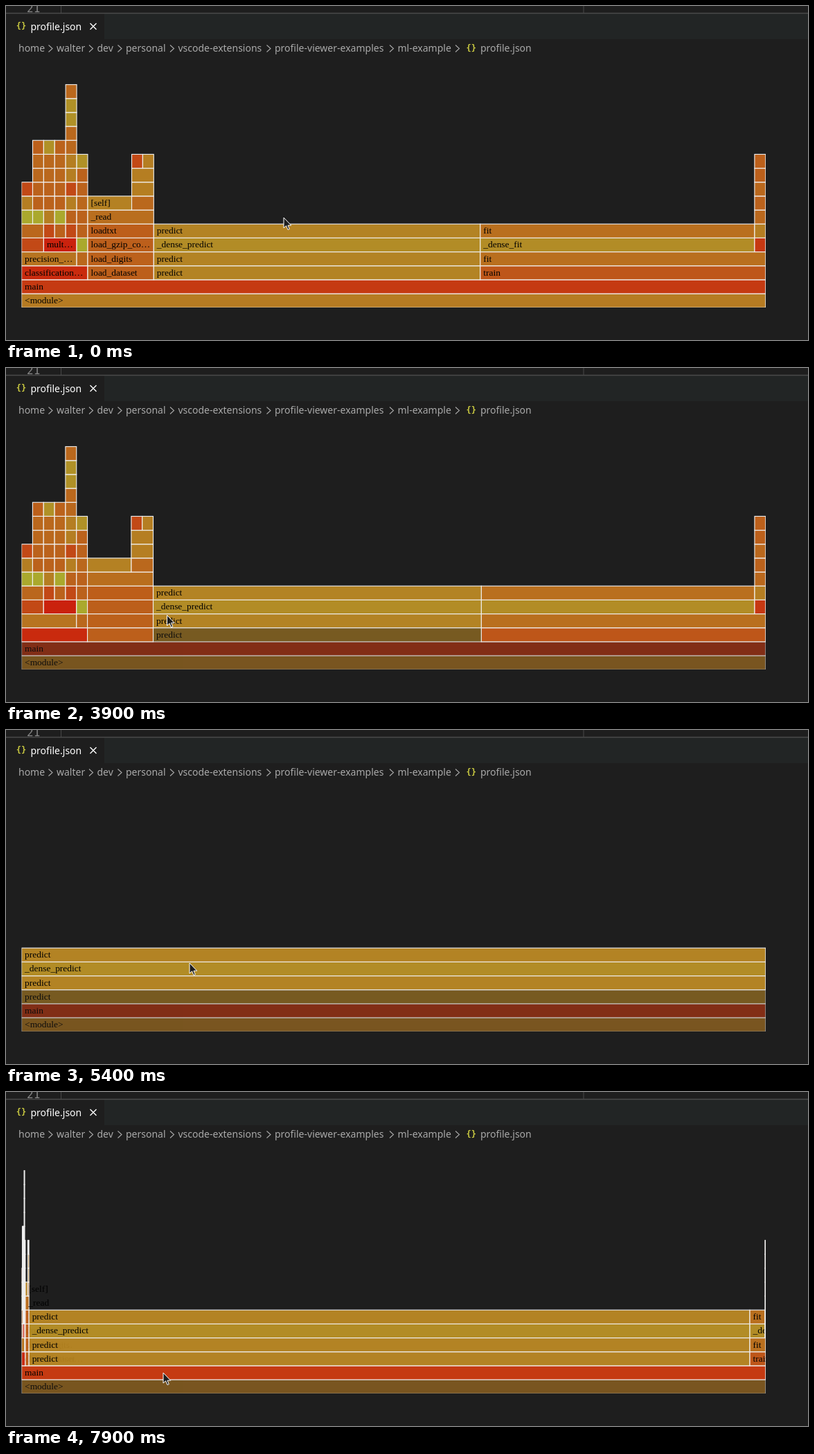
Write an HTML page that moves like this. It is 1158 px wide and 483 px high and loops after 8 s.

```html
<!DOCTYPE html>
<html lang="en">
<head>
<meta charset="utf-8">
<title>Flame graph</title>
<style>
  html, body { margin: 0; width: 100%; height: 100%; overflow: hidden; background: #1e1e1e; }
  svg { display: block; }
  #ui { font: 14px "Noto Sans", "Open Sans", sans-serif; fill: #a9a9a9; }
  .brace { font: bold 12px "DejaVu Sans Mono", monospace; fill: #cbcb41; }
  .line { font: 16px "DejaVu Sans Mono", monospace; fill: #858585; }
  #chart text { font: 13.44px "Liberation Serif", serif; fill: #000; }
  #chart rect { fill-opacity: .8; stroke: #eee; stroke-width: 1.12; }
</style>
</head>
<body>
<svg id="stage" width="1158" height="483" viewBox="0 0 1158 483">
  <g id="ui">
    <rect x="142" y="11" width="1016" height="37" fill="#222525"/>
    <text class="line" x="30" y="8.5">21</text>
    <path d="M79.5 0V10M834 0V10" stroke="#484848"/>
    <path d="M0 10.5H1158" stroke="#4a4a4a" stroke-width="1.5"/>
    <text class="brace" x="14.7" y="33">{}</text>
    <text x="35.5" y="34.5" fill="#fff">profile.json</text>
    <path d="M121.5 25l9 9m0-9l-9 9" stroke="#fff" stroke-width="1.4"/>
    <text class="brace" x="664.5" y="65">{}</text>
  </g>
  <svg id="chart" x="22.5" y="113" width="1074.5" height="323" viewBox="22.5 113 1074.5 323"></svg>
  <path id="cursor" d="M0 0V15L3.6 11.8L6 17.5L8.3 16.5L6 11.2H10.7Z" fill="#1e1e1e" stroke="#fff"/>
</svg>
<script>
const LOOP = 8000, STEP = 100;
const LEFT = 22.6, BOTTOM = 436.2, ROW = 20.16, UNIT = 15.89;
const START = 12, SPLIT = 41.67, TOTAL = 67.6, END = TOTAL - 1;
const MIN_LABEL = 39, MARGIN = 4.5;
const ZOOM_IN = 3825, ZOOMED = 4700, ZOOM_OUT = 7700, DURATION = 750;

const $ = id => document.getElementById(id);
const clamp = k => Math.max(0, Math.min(1, k));
function set(el, attrs) {
  for (const k in attrs) el.setAttribute(k, attrs[k]);
}
function add(parent, tag, attrs, text = "") {
  const el = document.createElementNS("http://www.w3.org/2000/svg", tag);
  set(el, attrs);
  el.textContent = text;
  parent.append(el);
  return el;
}

// Breadcrumbs, each followed by a chevron
const crumbs = { home: 18, walter: 73, dev: 131.5, personal: 173, "vscode-extensions": 248.5,
  "profile-viewer-examples": 388, "ml-example": 565.5, "profile.json": 685 };
for (const [name, x] of Object.entries(crumbs)) {
  add($("ui"), "text", { x, y: 66 }, name);
  if (x === crumbs.home) continue;
  const tip = x - (name === "profile.json" ? 30.5 : 6);
  add($("ui"), "path", { d: `M${tip - 5.5} 56.5l5.5 5l-5.5 5`, fill: "none", stroke: "#a9a9a9", "stroke-width": 1.1 });
}

// The heat of a frame comes from the first letters of its function name
function heat(name) {
  let sum = 0, max = 0, weight = 1;
  for (const c of name.slice(0, 7)) {
    sum += weight * (c.charCodeAt(0) % 10);
    max += weight * 9;
    weight *= .7;
  }
  return sum / max;
}
function colour(name) {
  const v = heat(name);
  return `rgb(${200 + 55 * v},${230 * (1 - v)},${55 * (1 - v)})`;
}

// Call tree: calls stacked upward from a row
const nodes = [];
function stack(from, to, row, calls) {
  calls.split(" ").forEach((name, i) => nodes.push({ from, to, row: row + i, name }));
}
stack(0, TOTAL, 0, "<module> main");
stack(0, 6, 2, "classification_report");
stack(0, 5, 3, "precision_recall_fscore_support");
stack(0, 2, 4, "_check_targets unique_labels");
stack(2, 5, 4, "multilabel_confusion_matrix");
stack(0, 1, 6, "<genexpr> type_of_target _check_targets");
stack(1, 2, 6, "<genexpr> _unique _unique unique unique isinstance");
stack(2, 3, 5, "_check_targets type_of_target _unique _unique unique unique ndim");
stack(3, 4, 5, "_unique <genexpr> _unique _unique unique unique _unique");
stack(4, 5, 5, "_check_targets _unique type_of_target _check_targets type_of_target type_of_target unique unique ndim ndim unique");
stack(5, 6, 3, "unique <genexpr> _unique _unique unique _unique _unique ndim");
stack(6, START, 2, "load_dataset load_digits load_gzip_compressed_csv_data loadtxt _read");
stack(6, 10, 7, "[self]");
stack(10, START, 7, "unique type_of_target type_of_target");
stack(10, 11, 10, "_check_targets");
stack(11, START, 10, "type_of_target");
stack(START, SPLIT, 2, "predict predict _dense_predict predict");
stack(SPLIT, TOTAL, 2, "train fit");
stack(SPLIT, END, 4, "_dense_fit fit");
stack(END, TOTAL, 4, "sum type_of_target unique _unique unique isinstance isinstance");
nodes.sort((a, b) => a.row - b.row || a.from - b.from);

function shorten(text, room) {
  const name = text.textContent;
  for (let n = name.length - 1; n > 0 && text.getComputedTextLength() > room; n--)
    text.textContent = name.slice(0, n) + "…";
}

for (const n of nodes) {
  const width = UNIT * (n.to - n.from), y = BOTTOM - ROW * (n.row + 1);
  n.focused = n.from < SPLIT && n.to > START;
  n.g = add($("chart"), "g", {});
  n.rect = add(n.g, "rect", { y, height: ROW, fill: colour(n.name) });
  n.text = add(n.g, "text", { y: y + 14 }, width < MIN_LABEL ? "" : n.name);
  shorten(n.text, width - 2 * MARGIN);
}

// Pointer moves: first step, last step, x, y
const moves = [[0, 0, 401, 306], [100, 200, 466, 357], [400, 700, 475, 399], [1000, 1400, 484, 363],
  [2900, 2900, 300, 362], [3100, 3200, 232.5, 357.5], [4000, 4800, 257, 353], [5100, 5100, 265, 337],
  [6200, 6200, 571, 362], [6600, 6800, 234, 398], [7100, 7200, 227, 406]];

function pointer(t) {
  let x = 0, y = 0;
  for (const [first, last, toX, toY] of moves) {
    if (t < first) break;
    const k = clamp((t - first + STEP) / (last - first + STEP)) ** 2;
    x += (toX - x) * k;
    y += (toY - y) * k;
  }
  return [x, y];
}

function ease(t) {
  const k = clamp(t / DURATION);
  return k < .5 ? 4 * k ** 3 : 1 - 4 * (1 - k) ** 3;
}

function draw(t) {
  const out = t >= ZOOM_OUT, zooming = t >= ZOOM_IN && !out;
  const zoom = out ? 1 - ease(t - ZOOM_OUT - 20) : ease(t - ZOOM_IN);
  const dimRows = out ? 1 : zooming ? 3 : 0;
  const place = u => {
    const target = clamp((u - START) / (SPLIT - START)) * TOTAL;
    return LEFT + UNIT * (u + (target - u) * zoom);
  };
  for (const n of nodes) {
    const x = place(n.from), aside = zooming && !n.focused;
    set(n.g, { display: aside && t >= ZOOMED ? "none" : "inline", opacity: n.focused && n.row < dimRows ? .6 : 1 });
    set(n.rect, { x, width: Math.max(.01, place(n.to) - x) });
    set(n.text, { x: x + MARGIN, display: aside ? "none" : "inline" });
  }
  set($("cursor"), { transform: `translate(${pointer(t)})` });
}

const begin = performance.now();
function tick() {
  const t = (performance.now() - begin) % LOOP;
  draw(Math.floor(t / STEP) * STEP);
  requestAnimationFrame(tick);
}
tick();
</script>
</body>
</html>
```
